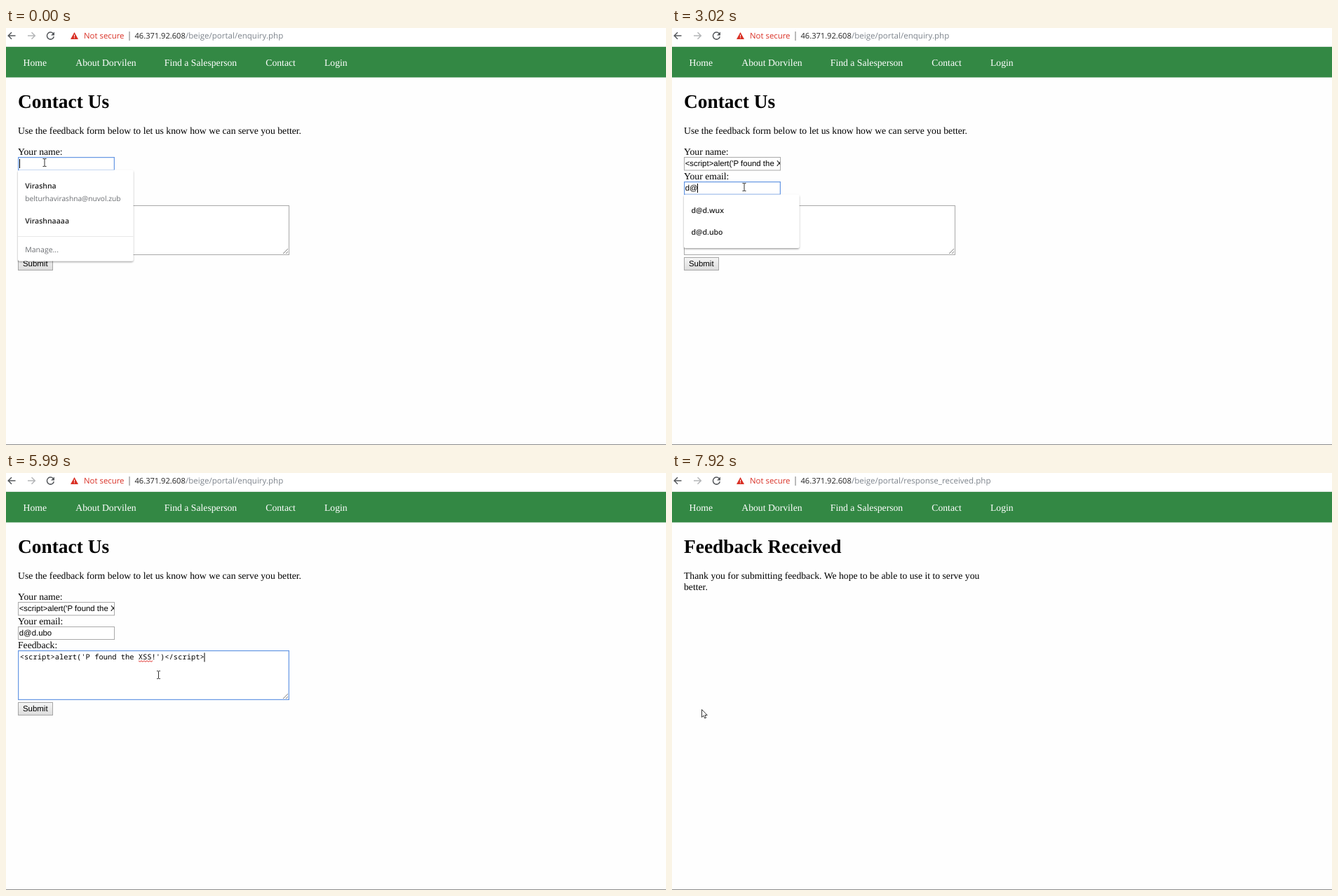
Write an HTML page that moves like this. It is 941x595 px and loops after 8000 ms.

```html
<!DOCTYPE html>
<html lang="en">
<head>
<meta charset="utf-8">
<title>Contact form</title>
<style>
  html, body { margin: 0; width: 100%; height: 100%; overflow: hidden; background: #fefefe; }
  svg { display: block; }
  text { white-space: pre; text-rendering: geometricPrecision; }
  .serif { font: 13.7px "Liberation Serif", serif; }
  .title { font: bold 27.4px "Liberation Serif", serif; }
  .field { font: 11.43px "Liberation Sans", sans-serif; }
  .mono { font: 10.45px "Noto Sans Mono", monospace; }
  .bar { font: 11.4px "Open Sans", sans-serif; }
  .option { font: 600 10.5px "Open Sans", sans-serif; fill: #222; }
  .hint { font: 10.2px "Open Sans", sans-serif; fill: #6b6e72; }
  .line { fill: none; stroke-width: 1.5; }
</style>
</head>
<body>
<svg width="941" height="595" viewBox="0 0 941 595">
  <defs>
    <clipPath id="nameClip"><path d="M18 185h136v18H18z"/></clipPath>
    <linearGradient id="buttonFill" x2="0" y2="1">
      <stop stop-color="#f6f6f6"/><stop offset="1" stop-color="#dcdcdc"/>
    </linearGradient>
    <filter id="shadow" x="-10%" y="-10%" width="120%" height="125%">
      <feDropShadow dx="0" dy="1.4" stdDeviation=".9" flood-opacity=".38"/>
    </filter>
  </defs>
  <path d="M0 0h941v27H0z" fill="#fff"/>
  <path d="M0 26.5h941" stroke="#dfe6e0"/>
  <path class="line" d="M13.5 11H3.5M8 6.2L3.2 11L8 15.8" stroke="#55585c"/>
  <path class="line" d="M31 11H41M36.5 6.2L41.3 11L36.5 15.8" stroke="#b4b6b8"/>
  <path d="M97.5 6L103 16H92z" fill="#d93025"/>
  <path d="M97.5 9.5v3M97.5 13.3v1.2" stroke="#fff"/>
  <text class="bar" x="111" y="15" fill="#d93025">Not secure</text>
  <path d="M176 5v13" stroke="#777"/>
  <text class="bar" x="183.5" y="15" fill="#222" style="font-size:11.1px">46.371.92.608</text>
  <path d="M0 27h941v43.5H0z" fill="#338844"/>
  <g class="serif" fill="#fff">
    <text x="24.5" y="54">Home</text>
    <text x="99.3" y="54">About Dorvilen</text>
    <text x="225.8" y="54">Find a Salesperson</text>
    <text x="370.3" y="54">Contact</text>
    <text x="454" y="54">Login</text>
  </g>
  <path d="M0 594.5h941" stroke="#8c8c8c"/>
  <g id="page"></g>
</svg>
<script>
const LOOP = 8000;
const PASTED = "<script>alert('P found the XSS!')<\/script>";
const SUGGESTIONS = ["d@d.wux", "d@d.ubo"];
const ALL_SUGGESTIONS = ["belturhavirashna@nuvol.zub", ...SUGGESTIONS, "virashna@nuvol.zub", "virashna@keldo.onn"];
const page = document.getElementById("page");

// Each timeline lists [start time, value].
const FOCUS = [[0, "name"], [1860, "email"], [5280, "feedback"], [7340, "button"]];
const CARET = [[0, true], [150, false], [560, true], [1130, false], [1580, true], [2310, false],
  [2590, true], [6400, false], [6940, true]];
const EMAIL = [[0, ""], [2590, "d"], [3020, "d@"], [3450, "d@d"], [3730, "d@d."],
  [3870, "d@d.u"], [4010, "d@d.ub"], [4160, "d@d.ubo"]];
const OPTIONS = [[0, []], [2590, ALL_SUGGESTIONS], [3020, SUGGESTIONS], [3870, ["d@d.ubo"]], [4580, []]];
const POINTER = [[0, [55, 192]], [1130, [60, 196]], [1280, [72, 205]], [1430, [86, 216]], [1580, [98, 224]],
  [1730, [103, 227]], [4860, [122, 237]], [5000, [160, 257]], [5140, [200, 279]], [5280, [217.5, 288]],
  [6400, [195, 301]], [6530, [150, 330]], [6670, [100, 353]], [6800, [65, 360]], [6940, [48, 348]], [7070, [42, 337]]];

const at = (timeline, t) => timeline.findLast(([start]) => start <= t)[1];
const escapeText = s => s.replace(/&/g, "&amp;").replace(/</g, "&lt;");
const text = (style, x, y, s, extra = "") => `<text class="${style}" x="${x}" y="${y}" ${extra}>${escapeText(s)}</text>`;
const caret = (x, y) => `<path d="M${x} ${y}v13" stroke="#000"/>`;

function box(x, y, w, h, focused) {
  const weight = focused ? 1.25 : 1;
  return `<rect x="${x + weight / 2}" y="${y + weight / 2}" width="${w - weight}" height="${h - weight}" fill="#fff"
    stroke="${focused ? "#6a9ae4" : "#a9a9a9"}" stroke-width="${weight}"/>`;
}

function squiggle(x, y, width) {
  let d = `M${x} ${y}`;
  for (let i = 2; i <= width; i += 2) d += `L${x + i} ${y + (i % 4 ? 1.6 : 0)}`;
  return `<path d="${d}" fill="none" stroke="#e0302c"/>`;
}

function panel(top, right, bottom) {
  return `<rect x="17" y="${top}" width="${right - 17}" height="${bottom - top}" rx="2.5" fill="#fff" filter="url(#shadow)"/>`;
}

function nameMenu() {
  return panel(202.5, 181.5, 332.5) +
    text("option", 27.3, 229, "Virashna") +
    text("hint", 27.3, 247, "belturhavirashna@nuvol.zub") +
    text("option", 27.3, 279, "Virashnaaaa") +
    `<path d="M17 297.5h164.5" stroke="#e8e8e8"/>` +
    text("hint", 27.3, 320, "Manage...", 'style="font-size:10.5px"');
}

function emailMenu(options) {
  if (!options.length) return "";
  const right = options.length > 2 ? 201.5 : 181.5;
  return panel(237.5, right, 252 + 31 * options.length) +
    options.map((s, i) => text("option", 27.5, 264 + 31 * i, s)).join("");
}

function nameField(t, focused, caretOn) {
  let s = box(17, 184, 138, 19.5, focused);
  if (t >= 560) {
    s += `<g clip-path="url(#nameClip)">` + (focused
      ? text("field", 152.5, 197, PASTED, 'text-anchor="end"') + squiggle(77, 198.6, 24)
      : text("field", 18.7, 197, PASTED)) + "</g>";
  }
  if (focused && caretOn) s += caret(t < 560 ? 19.5 : 153, 187);
  return s;
}

function emailField(value, focused, caretOn) {
  const advance = { "@": 1.015, ".": .278 };
  const width = [...value].reduce((sum, c) => sum + (advance[c] ?? .556) * 11.43, 0);
  return box(17, 219, 138, 19, focused) + text("field", 18.7, 231.5, value) +
    (focused && caretOn ? caret(Math.floor(18.7 + width) + .5, 222) : "");
}

function feedbackField(t, focused, caretOn) {
  let s = box(17, 253, 387, 71, focused) +
    `<path d="M395 322l7-7M399 322l3-3" stroke="#777" stroke-width=".9"/>`;
  if (t >= 5850) s += text("mono", 19.7, 266.3, PASTED);
  if (t >= 5990) s += squiggle(189, 267.8, 20);
  if (focused && caretOn) s += caret(t < 5850 ? 20.5 : 283, 256.5);
  return s;
}

function button(t, focused) {
  return `<rect x="17.5" y="327.5" width="49" height="18" fill="url(#buttonFill)"
    stroke="${focused ? "#6a9ae4" : t >= 7070 ? "#808080" : "#a6a6a6"}"/>` +
    text("field", 24, 340, "Submit");
}

function form(t) {
  const focus = at(FOCUS, t), caretOn = at(CARET, t);
  return text("title", 17, 113.6, "Contact Us") +
    text("serif", 17, 151, "Use the feedback form below to let us know how we can serve you better.") +
    text("serif", 17, 181, "Your name:") +
    text("serif", 17, 216, "Your email:") +
    text("serif", 17, 250, "Feedback:") +
    nameField(t, focus === "name", caretOn) +
    emailField(at(EMAIL, t), focus === "email", caretOn) +
    feedbackField(t, focus === "feedback", caretOn) +
    button(t, focus === "button") +
    (t < 560 ? nameMenu() : emailMenu(at(OPTIONS, t)));
}

function thanks() {
  return text("title", 17, 113.6, "Feedback Received") +
    text("serif", 17, 151, "Thank you for submitting feedback. We hope to be able to use it to serve you") +
    text("serif", 17, 167, "better.");
}

function pointer(t) {
  const [x, y] = at(POINTER, t);
  return `<g transform="translate(${x} ${y})">` + (y > 324
    ? `<path d="M.5 .5V11.5L3 9.2L4.8 13L6.6 12.2L4.9 8.5H8.2z" fill="#fff" stroke="#222" stroke-width=".9"/>`
    : `<path d="M-2.5 -5.5H-.8L0 -5L.8 -5.5H2.5M0 -5V5M-2.5 5.5H-.8L0 5L.8 5.5H2.5" fill="none" stroke="#333"/>`) + "</g>";
}

function addressBar(t) {
  const file = t < 7770 ? "enquiry" : "response_received";
  const loading = t >= 7340 && t < 7920;
  return text("bar", 256, 15, `/beige/portal/${file}.php`, 'fill="#7d848c" style="font-size:11.55px"') +
    (loading
      ? `<path class="line" d="M59 6.5l9 9M68 6.5l-9 9" stroke="#55585c"/>`
      : `<path class="line" d="M67.2 7.8A5 5 0 1 0 68.3 12.3" stroke="#55585c"/><path d="M69 5.5v5h-5z" fill="#55585c"/>`);
}

let shown = "";
function draw(now) {
  const t = now % LOOP;
  const markup = addressBar(t) + (t < 7770 ? form(t) : thanks()) + pointer(t);
  if (markup !== shown) page.innerHTML = shown = markup;
  requestAnimationFrame(draw);
}
draw(0);
</script>
</body>
</html>
```
